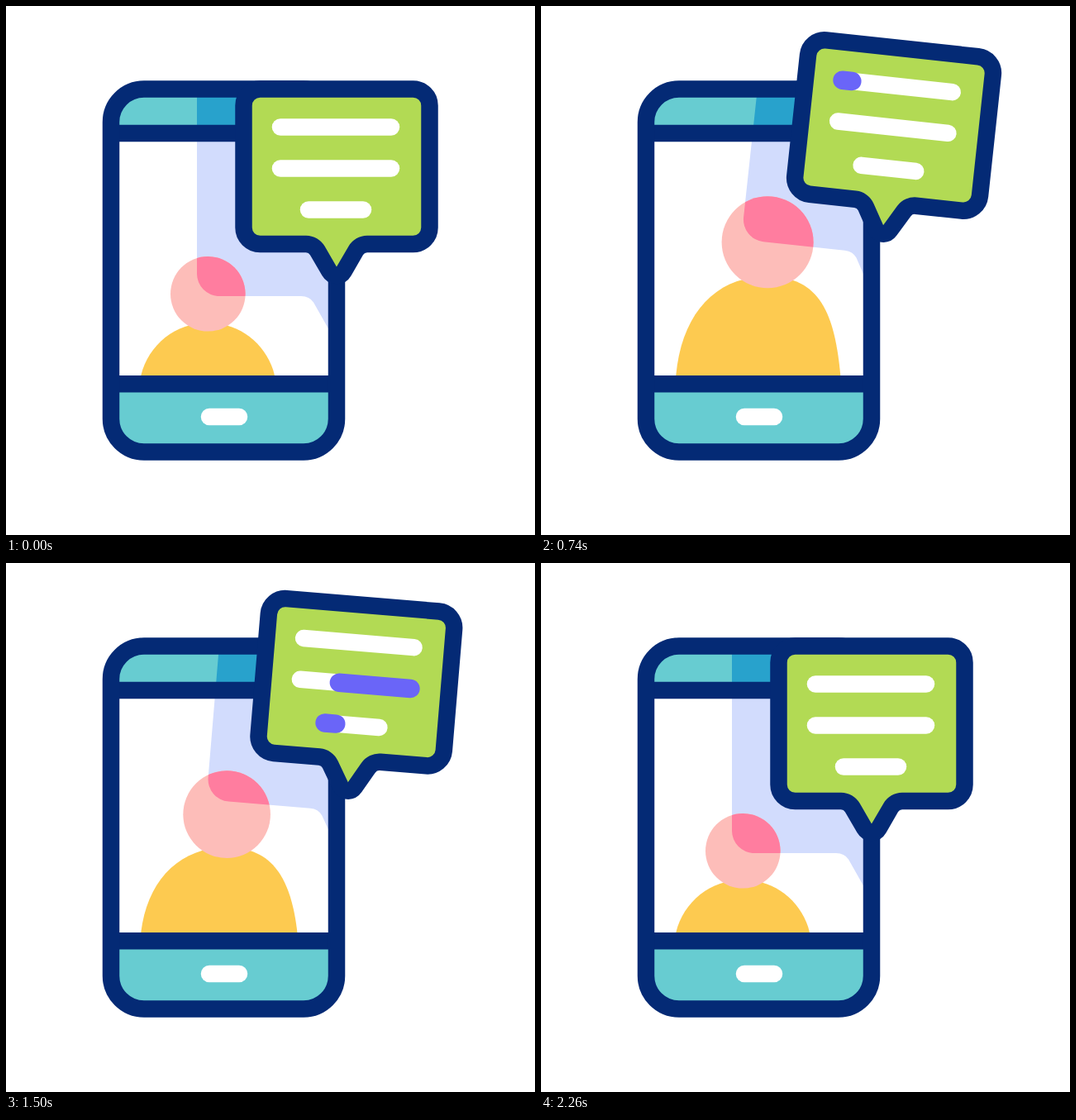
Write an HTML page that moves like this. It is 640 by 640 pixels and loops after 2400 ms.

```html
<!DOCTYPE html>
<html lang="en">
<head>
<meta charset="utf-8">
<title>Phone chat</title>
<style>
  html, body { margin: 0; width: 100%; height: 100%; overflow: hidden; background: #fff; }
  svg { display: block; width: 100vw; height: 100vh; }
  .ink { stroke: #042a75; stroke-width: 20.5; }
  .bar { stroke: #fff; stroke-width: 20.5; stroke-linecap: round; }
  .sweep { stroke: #6a65f8; stroke-width: 22.5; stroke-linecap: round; }
</style>
</head>
<body>
<svg viewBox="0 0 640 640">
  <defs>
    <clipPath id="header"><rect x="127" y="101" width="273" height="53"/></clipPath>
    <clipPath id="screen"><rect x="127" y="154" width="273" height="303"/></clipPath>
    <clipPath id="face"><circle class="head"/></clipPath>
    <path id="shade" class="swing" d="M231 20V324A27 27 0 0 0 258 351H357Q367 351 372 358.5L430 461V20Z"/>
  </defs>

  <rect x="127" y="100.5" width="273" height="439" rx="40" fill="#67ccd1"/>
  <rect x="127" y="154" width="273" height="303" fill="#fff"/>
  <g clip-path="url(#header)"><use href="#shade" fill="#28a2cc"/></g>
  <g clip-path="url(#screen)">
    <use href="#shade" fill="#d2dcfd"/>
    <path id="body" fill="#fdca50"/>
    <circle class="head" fill="#fdbdb9"/>
    <g clip-path="url(#face)"><use href="#shade" fill="#ff7d9f"/></g>
  </g>
  <path class="ink" d="M127 154H400M127 457.3H400"/>
  <rect class="ink" x="127" y="100.5" width="273" height="439" rx="40" fill="none"/>
  <path class="bar" d="M246 497H282"/>

  <g class="swing" id="bubble">
    <path class="ink" fill="#b2da54" d="M307.5 100.5H492.5A20 20 0 0 1 512.5 120.5V268A20 20 0 0 1 492.5 288H437
      A16 16 0 0 0 423.2 296L408.7 321A10 10 0 0 1 391.3 321L376.8 296A16 16 0 0 0 363 288H307.5
      A20 20 0 0 1 287.5 268V120.5A20 20 0 0 1 307.5 100.5Z"/>
  </g>
</svg>
<script>
  const LOOP = 2400, BEAT = 400;
  const SWING = [0, 11.8, -8, 7, -7, 0];   // tilt in degrees at each beat
  const CENTER = 399, LINES = [134, 134, 66];

  const all = q => [...document.querySelectorAll(q)];
  const swings = all('.swing'), heads = all('.head');
  const body = document.getElementById('body'), bubble = document.getElementById('bubble');

  function set(el, attrs) {
    for (const name in attrs) el.setAttribute(name, attrs[name]);
  }

  function addLine(kind, attrs) {
    const el = document.createElementNS('http://www.w3.org/2000/svg', 'line');
    set(el, { class: kind, ...attrs });
    return bubble.appendChild(el);
  }

  const bars = LINES.map((length, i) => {
    const y = 146.5 + 50 * i, x1 = CENTER - length / 2;
    addLine('bar', { x1, x2: x1 + length, y1: y, y2: y });
    return { x1, length, line: addLine('sweep', { y1: y, y2: y }) };
  });

  function ease(from, to, t) {
    const u = Math.min(1, Math.max(0, (t - from) / (to - from)));
    return u * u * (3 - 2 * u);
  }

  function drawPerson(t) {
    const up = ease(0, 840, t), settle = ease(840, 1215, t), back = ease(1240, 2015, t);
    const grow = ease(0, 600, t) - back;
    const x = 244.3 + 31 * (up - back);
    const y = 348.3 - 65 * up + 5 * settle + 60 * back;
    heads.forEach(el => set(el, { cx: x, cy: y, r: 45.3 + 10.2 * grow }));

    const left = 163.3, right = 325 + 37.3 * grow, base = 447;
    const top = y + 35 + 6.5 * grow;
    const lean = 9 - 2 * grow, low = base + 5.4 - 0.67 * (base - top);
    const shoulder = x - (x - left) * (0.48 + 0.09 * grow);
    set(body, { d: `M${left} ${base}C${left + lean} ${low} ${shoulder} ${top} ${x} ${top}` +
      `S${right - lean} ${low} ${right} ${base}V460H${left}Z` });
  }

  function drawBubble(t) {
    const rise = ease(200, 600, t) - ease(1800, 2200, t);
    const tilt = SWING.reduce((sum, angle, i) =>
      i ? sum + (angle - SWING[i - 1]) * ease(BEAT * i - 200, BEAT * i + 200, t) : angle, 0);
    const transform = `translate(${12.7 * rise} ${-50.5 * rise}) rotate(${tilt} 400 328)`;
    swings.forEach(el => set(el, { transform }));
  }

  // Each sweep's front leaves first and its back follows, shorter lines taking less time
  function drawSweeps(t) {
    bars.forEach(({ x1, length, line }, i) => {
      const time = 360 * length / LINES[0];
      const front = 675 + 387 * i, back = 990 + 367 * i;
      const at = start => x1 + length * ease(start, start + time, t);
      const shown = t > front && t < back + time;
      set(line, { x1: at(back), x2: at(front), visibility: shown ? 'visible' : 'hidden' });
    });
  }

  const begin = performance.now();
  function frame() {
    const t = (performance.now() - begin) % LOOP;
    drawPerson(t);
    drawBubble(t);
    drawSweeps(t);
    requestAnimationFrame(frame);
  }
  frame();
</script>
</body>
</html>
```
